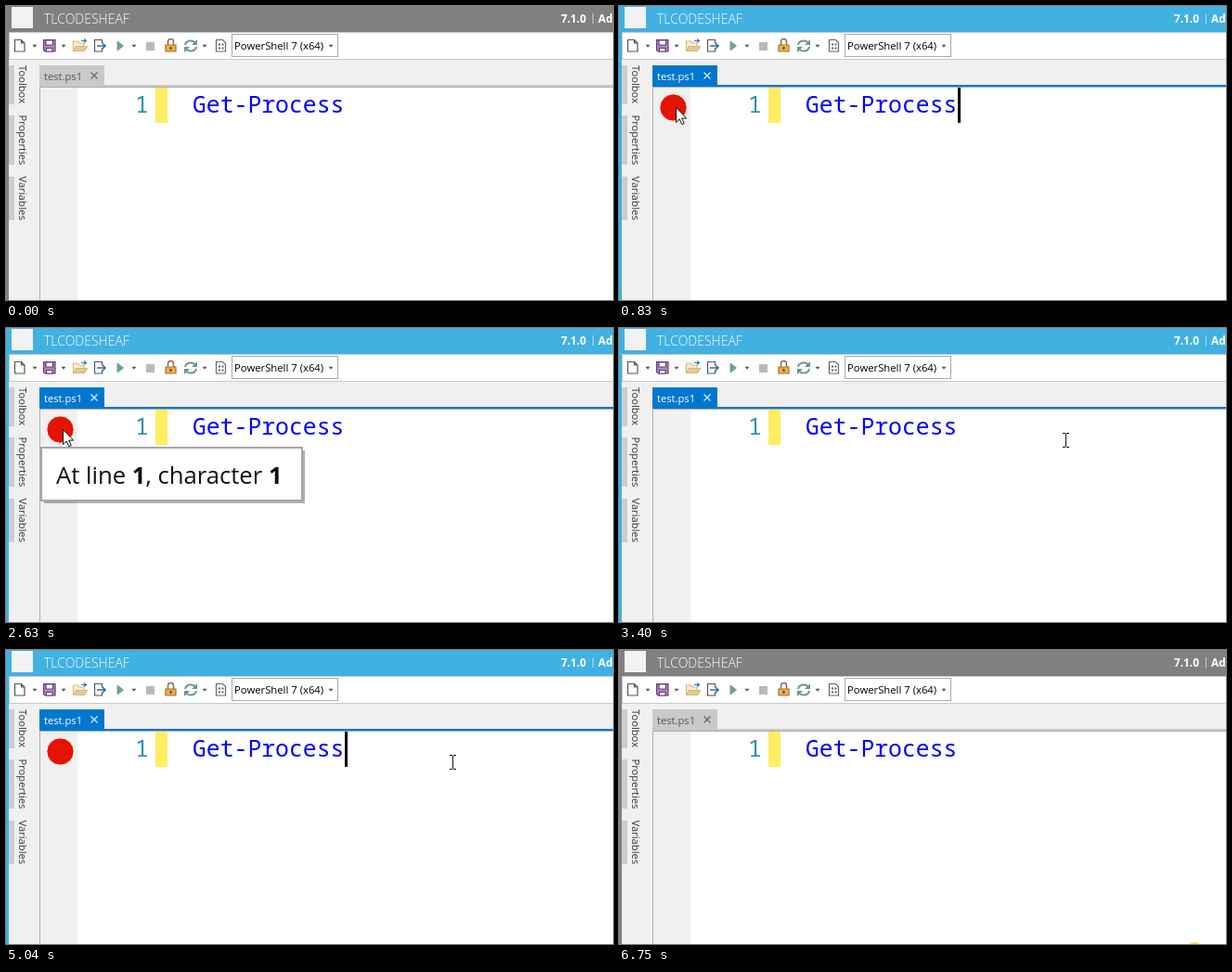
These frames come from a looping animation (654x317 px, 6.82 s). An HTML page:

```html
<!DOCTYPE html>
<html lang="en">
<head>
<meta charset="utf-8">
<title>Breakpoint toggle</title>
<style>
  html, body { margin: 0; width: 100%; height: 100%; overflow: hidden; background: #fff; }
  svg { display: block; width: 100%; height: 100%; font-family: "Open Sans", "Noto Sans", sans-serif; }
  text { white-space: pre; }
  .ui { font-size: 11.2px; fill: #333; }
  .code { font: 500 24.75px "Noto Sans Mono", monospace; }
  .hard { shape-rendering: crispEdges; }
  .title { font-size: 14px; font-weight: 300; fill: #fff; }
  .info { font-size: 11.8px; font-weight: 700; fill: #fff; }

  .idle, .caret, .dot, .tip, .arrow, .beam, .click, .pointer {
    animation: 6820ms step-end infinite;
  }
  .idle { animation-name: idle; }
  .caret { animation-name: caret; }
  .dot { animation-name: dot; }
  .tip { animation-name: tip; }
  .arrow { animation-name: arrow; }
  .beam { animation-name: beam; }
  .click { animation-name: click; }
  .pointer { animation-name: move; }

  @keyframes idle {
    0%, 98.974%, 100% { opacity: 1; }
    12.170% { opacity: 0; }
  }
  @keyframes caret {
    0%, 19.208%, 33.871%, 49.853%, 87.243%, 98.974%, 100% { opacity: 0; }
    12.170%, 26.979%, 41.935%, 56.598%, 95.015% { opacity: 1; }
  }
  @keyframes dot {
    0%, 23.607%, 39.633%, 68.035%, 79.472%, 100% { opacity: 0; }
    12.170%, 31.378%, 62.463%, 73.900% { opacity: 1; }
  }
  @keyframes tip {
    0%, 31.378%, 40.762%, 100% { opacity: 0; }
    16.569%, 38.563% { opacity: 1; }
  }
  @keyframes arrow {
    0%, 40.762%, 100% { opacity: 0; }
    6.378% { opacity: 1; }
  }
  @keyframes beam {
    0%, 6.378%, 95.308%, 100% { opacity: 0; }
    1.906%, 40.762% { opacity: 1; }
  }
  @keyframes click {
    0%, 100% { opacity: 0; }
    98.974% { opacity: 1; }
  }
  @keyframes move {
    0% { transform: translate(386px, 256px); }
    1.906% { transform: translate(386px, 256px); animation-timing-function: steps(2); }
    4.150% { transform: translate(150px, 200px); animation-timing-function: steps(3); }
    7.493% { transform: translate(0, 150px); animation-timing-function: steps(3); }
    10.850% { transform: translate(61px, 109px); }
    39.633% { transform: translate(61px, 109px); animation-timing-function: steps(2); }
    41.891% { transform: translate(280px, 128px); animation-timing-function: steps(3); }
    45.308% { transform: translate(480px, 121px); }
    48.680% { transform: translate(481px, 121px); }
    85.411% { transform: translate(481px, 121px); animation-timing-function: steps(9); }
    95.308%, 100% { transform: translate(618px, 332px); }
  }
</style>
</head>
<body>
<svg viewBox="0 0 654 317" preserveAspectRatio="none">
  <defs>
    <path id="drop" d="M-2.5 -1.2h5l-2.5 3z" fill="#555"/>
    <path id="cross" d="M-3.5 -3.5l7 7m0 -7l-7 7" fill="none" stroke-width="1.2"/>
  </defs>

  <!-- window -->
  <g class="hard">
    <rect width="654" height="317" fill="#f0f0f0"/>
    <rect x="3" y="28" width="651" height="30" fill="#c8c8c8"/>
    <rect x="4" y="29" width="650" height="28" fill="#fff"/>
    <rect x="36" y="87" width="618" height="230" fill="#acacac"/>
    <rect x="37" y="88" width="40" height="229" fill="#f0f0f0"/>
    <rect x="77" y="88" width="577" height="229" fill="#fff"/>
  </g>

  <!-- focused frame -->
  <g class="hard">
    <path d="M0 0H654V28H3V317H0z" fill="#41b1e1"/>
    <path d="M36 64H106V85H654V87H36z" fill="#0077cf"/>
  </g>
  <text class="ui" x="41" y="79.5" style="fill:#fff">test.ps1</text>
  <use href="#cross" x="95" y="75" stroke="#d8ecfa"/>

  <!-- unfocused frame -->
  <g class="idle">
    <g class="hard">
      <path d="M0 0H654V28H3V317H0z" fill="#808080"/>
      <path d="M36 64H106V85H654V87H36z" fill="#c9c9c9"/>
    </g>
    <text class="ui" x="41" y="79.5" style="fill:#555">test.ps1</text>
    <use href="#cross" x="95" y="75" stroke="#666"/>
  </g>

  <rect x="6" y="1" width="23" height="23" fill="#f2f2f2"/>
  <text class="title" x="41" y="19">TLCODESHEAF</text>
  <text class="info" x="598" y="18">7.1.0</text>
  <path class="hard" d="M632 8h1v11h-1z" fill="#fff" opacity=".6"/>
  <text class="info" x="638" y="18">Administrator</text>

  <!-- toolbar -->
  <g fill="none" stroke-width="1.2">
    <path d="M9.5 36.500h7l3.500 3.500v9h-10.500zM16.500 36.500v3.500h3.500" stroke="#555"/>
    <path d="M40.500 36.500h12.500v12.500h-11l-1.500 -1.500z" fill="#a98ab8" stroke="#6a3d7c"/>
    <path d="M43 37h7.500v5h-7.500zM43.500 45.500h6.500v3.500h-6.500z" fill="#fff" stroke="#6a3d7c"/>
    <path d="M72.500 48v-10h5l1.500 2h5v3" fill="#f8edd8" stroke="#dcb67a"/>
    <path d="M72.500 48.500l3 -5h12l-3 5z" fill="#e6c894" stroke="#dcb67a"/>
    <path d="M81 37.500h5m-2 -2l2.500 2l-2.500 2" stroke="#2b7bb9"/>
    <path d="M103.500 40v-3.500h-8v12.500h8v-3.500" stroke="#555"/>
    <path d="M98 43h9m-3.500 -3.500l3.500 3.500l-3.500 3.500" stroke="#2f6f9c" stroke-width="1.500"/>
    <path d="M120 38l6.500 5l-6.500 5z" fill="#6aa39b" stroke="#5f9690" stroke-width=".8"/>
    <path d="M151 39h9v9h-9z" fill="#b9b9b9"/>
    <path d="M174.500 42v-3a3 3.500 0 0 1 6 0v3" stroke="#8a6a45" stroke-width="1.500"/>
    <path d="M172 42h11v7h-11z" fill="#eeb04a" stroke="#a5713a"/>
    <path d="M177.500 44v3" stroke="#6b4420" stroke-width="2"/>
    <path d="M193 42a6 5.500 0 0 1 11 -2M205 44a6 5.500 0 0 1 -11 2" stroke="#6d9690" stroke-width="2"/>
    <path d="M206 36v6h-6zM192 50v-6h6z" fill="#6d9690"/>
    <path d="M226.500 36.500h7l3 3v9.500h-10z" stroke="#666"/>
    <path d="M229 41.500h2m1.500 0h2M229 45.500h2m1.500 0h2" stroke="#4f6678" stroke-width="2"/>
    <path class="hard" d="M243.500 30.500h114v24h-114z" stroke="#a8a8a8" stroke-width="1"/>
  </g>
  <use href="#drop" x="31" y="43"/>
  <use href="#drop" x="62" y="43"/>
  <use href="#drop" x="138" y="43"/>
  <use href="#drop" x="214" y="43"/>
  <use href="#drop" x="350" y="43"/>
  <text class="ui" x="246" y="47" style="font-size:11.3px;fill:#000">PowerShell 7 (x64)</text>

  <!-- side panel -->
  <path class="hard" d="M3 64h6v42h-6zM3 118h6v53h-6zM3 184h6v47h-6z" fill="#cdcdcd"/>
  <g class="ui">
    <text transform="translate(14 64) rotate(90)">Toolbox</text>
    <text transform="translate(14 117.500) rotate(90)">Properties</text>
    <text transform="translate(14 183.500) rotate(90)">Variables</text>
  </g>

  <!-- editor -->
  <rect class="hard" x="161" y="88" width="13" height="38" fill="#ffee62"/>
  <text class="code" x="139" y="115" fill="#2b91af">1</text>
  <text class="code" x="201" y="115" fill="#00f">Get-Process</text>
  <rect class="caret hard" x="365" y="88" width="3" height="38"/>
  <circle class="dot" cx="58.500" cy="109.500" r="14.700" fill="#e51400" stroke="#fff"/>

  <g class="tip">
    <rect x="41" y="132" width="281" height="57" fill="#000" opacity=".3"/>
    <rect class="hard" x="38" y="129" width="281" height="57" fill="#fff" stroke="#a6a6a6" stroke-width="2"/>
    <text x="54" y="168" font-size="25.700" fill="#111">At line <tspan font-weight="700">1</tspan>, character <tspan font-weight="700">1</tspan></text>
  </g>

  <circle class="click" cx="620" cy="324.500" r="9.700" fill="#f3dd6a"/>

  <g class="pointer">
    <path class="arrow" d="M.5 .5v16l3.700 -3.500l2.600 5.700l2.400 -1.100l-2.500 -5.500h5z" fill="#fff" stroke="#111"/>
    <path class="beam hard" d="M-3 -8h3v1h1v-1h3v1h-3v14h3v1h-3v-1h-1v1h-3v-1h3v-14h-3z" fill="#111"/>
  </g>
</svg>
</body>
</html>
```
